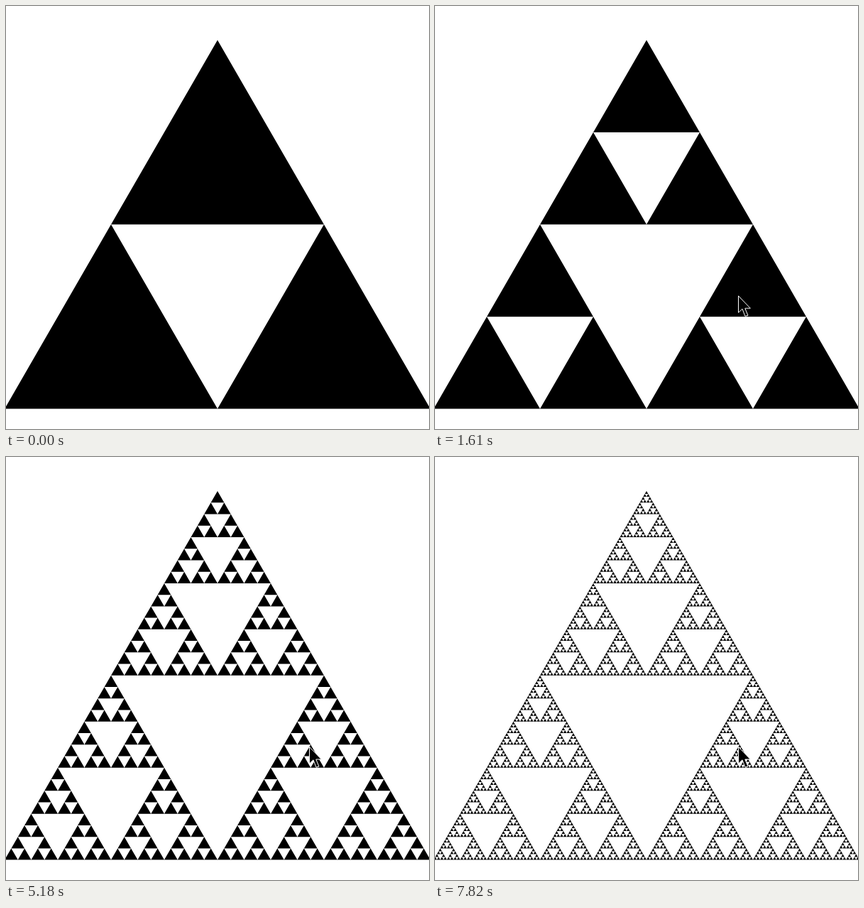
Recreate the animation shown at these times as an HTML page. Size 596x596 px, loop 8000 ms.

```html
<!DOCTYPE html>
<html lang="en">
<head>
<meta charset="utf-8">
<title>Sierpinski triangle</title>
<style>
  html, body { margin: 0; width: 100%; height: 100%; overflow: hidden; background: #fff; }
  svg { display: block; width: 100vw; height: 100vh; }
</style>
</head>
<body>
<svg viewBox="0 0 596 596">
  <path id="fractal"/>
  <path id="cursor" d="M.5 .5V24L6 18.8L10 29.2L14 28L9.8 18H17.4Z"
        stroke="#fff" stroke-width="1" visibility="hidden"/>
</svg>
<script>
const LOOP = 8000;
const SIDE = 600;
const RATIO = Math.sqrt(3) / 2;
const APEX = { x: 298, y: 48 };

// Start time of each deeper subdivision.
const LEVELS = [0, 1610, 3000, 4120, 5180, 6630, 7820];

const MOVE = {
  start: 130, end: 750, steps: 9,
  from: { x: 367, y: 538 }, to: { x: 427, y: 408 }
};

const fractal = document.getElementById('fractal');
const cursor = document.getElementById('cursor');

// (x, y) is the apex of an upright equilateral triangle.
function triangles(x, y, side, depth) {
  const half = side / 2;
  const height = side * RATIO;
  if (!depth) return `M${x} ${y}L${x + half} ${y + height}H${x - half}Z`;
  const low = y + height / 2;
  return triangles(x, y, half, depth - 1) +
    triangles(x - half / 2, low, half, depth - 1) +
    triangles(x + half / 2, low, half, depth - 1);
}

const paths = LEVELS.map((_, i) => triangles(APEX.x, APEX.y, SIDE, i + 1));
let shown = -1;

function drawCursor(t) {
  cursor.setAttribute('visibility', t < MOVE.start ? 'hidden' : 'visible');
  const last = MOVE.steps - 1;
  const gap = (MOVE.end - MOVE.start) / last;
  const step = Math.max(0, Math.min(last, Math.floor((t - MOVE.start) / gap)));
  const p = 1 - (1 - step / last) ** 1.6;
  const at = axis => Math.round(MOVE.from[axis] + (MOVE.to[axis] - MOVE.from[axis]) * p);
  cursor.setAttribute('transform', `translate(${at('x')} ${at('y')})`);
}

function draw(t) {
  const level = LEVELS.filter(start => t >= start).length - 1;
  if (level !== shown) {
    fractal.setAttribute('d', paths[level]);
    shown = level;
  }
  drawCursor(t);
}

const begin = performance.now();
function tick() {
  draw((performance.now() - begin) % LOOP);
  requestAnimationFrame(tick);
}
tick();
</script>
</body>
</html>
```
